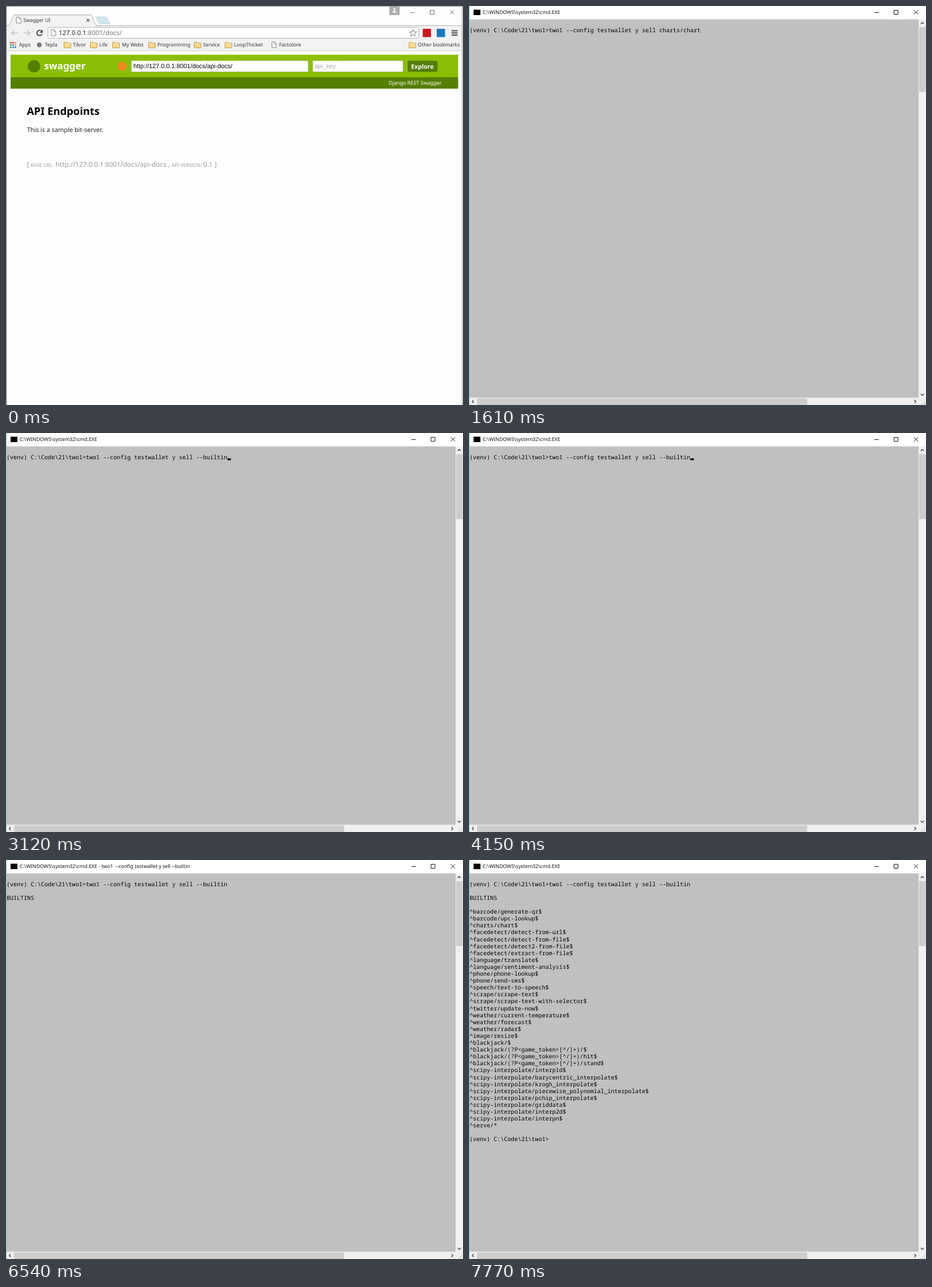
These frames come from a looping animation (800 px wide and 700 px high, 8 s). An HTML page:

```html
<!DOCTYPE html>
<html lang="en">
<head>
<meta charset="utf-8">
<title>Sell builtins</title>
<style>
  html, body { margin: 0; width: 100%; height: 100%; overflow: hidden; background: #fff; }
  svg { display: block; width: 800px; height: 700px; }
  text { white-space: pre; text-rendering: geometricPrecision; font-family: "Noto Sans", "Open Sans", sans-serif; }
  .mono { font-family: "Noto Sans Mono", "DejaVu Sans Mono", monospace; }
  .arial { font-family: "Liberation Sans", Arial, sans-serif; }
  .bold { font-weight: 700; }
</style>
</head>
<body>
<svg id="stage" viewBox="0 0 800 700" xmlns="http://www.w3.org/2000/svg">
  <g id="browser"></g>
  <g id="console"></g>
</svg>
<script>
const $ = id => document.getElementById(id);
const esc = s => s.replace(/&/g, '&amp;').replace(/</g, '&lt;');

const rect = (x, y, w, h, fill, more = '') =>
  `<rect x="${x}" y="${y}" width="${w}" height="${h}" fill="${fill}" ${more}/>`;
const line = (d, stroke, width = 1, more = '') =>
  `<path d="${d}" fill="none" stroke="${stroke}" stroke-width="${width}" ${more}/>`;
const disc = (x, y, r, fill) => `<circle cx="${x}" cy="${y}" r="${r}" fill="${fill}"/>`;
const label = (x, y, s, size, fill = '#000', cls = '') =>
  `<text x="${x}" y="${y}" font-size="${size}" fill="${fill}" class="${cls}">${esc(s)}</text>`;

const cross = (x, y, r, color, width) =>
  line(`M${x - r} ${y - r}l${2 * r} ${2 * r}m0 ${-2 * r}l${-2 * r} ${2 * r}`, color, width);
const windowButtons = (x, color) =>
  line(`M${x} 11.5h8`, color) +
  line(`M${x + 34.5} 7.5h7v7h-7z`, color) +
  cross(x + 73, 11, 3.7, color, 1);
const sheet = (x, y, w, h) =>
  `<path d="M${x} ${y}h${w - 3}l3 3v${h - 3}h${-w}z" fill="#fff" stroke="#777" stroke-width=".9"/>` +
  line(`M${x + w - 3} ${y}v3h3`, '#777', .8);
const folder = x =>
  `<path d="M${x + .5} 72.5v-8q0-1 1-1h3.5l1.5 1.5h5q1 0 1 1v6.5q0 1-1 1h-10q-1 0-1-1z"
    fill="#f8d790" stroke="#b98d35" stroke-width=".9"/>` + line(`M${x + 1.2} 66.3h10.6`, '#fff0c8', .8);

function starPath(cx, cy, outer, inner) {
  let d = '';
  for (let i = 0; i < 10; i++) {
    const r = i % 2 ? inner : outer, a = i * Math.PI / 5 - Math.PI / 2;
    d += `${i ? 'L' : 'M'}${(cx + r * Math.cos(a)).toFixed(2)} ${(cy + r * Math.sin(a)).toFixed(2)}`;
  }
  return d + 'z';
}

function appsGrid() {
  const colors = ['#e04a3f', '#e04a3f', '#f0a030', '#3aa757', '#4a7fd8', '#f0a030', '#3aa757', '#4a7fd8', '#4a7fd8'];
  return colors.map((c, i) => rect(7 + i % 3 * 4, 63 + Math.floor(i / 3) * 4, 2.8, 2.8, c)).join('');
}

function drawBrowser() {
  const ink = '#333', pale = '#c4c4c4', page = '#fefefe';
  const folders = [
    [101, 117, 'Tilvor'], [147, 163, 'Life'], [186, 203, 'My Webs'], [249, 265, 'Programming'],
    [329, 345, 'Service'], [383, 399, 'LoopThicket'], [705, 721, 'Other bookmarks']
  ];
  const grey = '#999';
  return rect(0, 0, 800, 700, page) +
    // tab strip
    rect(1, 34, 797, 45, '#f2f2f2') +
    line('M1 34.5H4M158 34.5H798', '#b4b4b4') +
    '<path d="M3 35q3 0 4-3l5-13q1-3 4-3h131q3 0 4 3l5 13q1 3 4 3z" fill="#f2f2f2"/>' +
    line('M1 34.5h2q3 0 4-3l5-13q1-3 4-3h131q3 0 4 3l5 13q1 3 4 3', '#aaa') +
    '<path d="M159 19h15q2 0 3 2l4 8q1 2-1 2h-15q-2 0-3-2l-4-8q-1-2 1-2z" fill="#d2e6ee" stroke="#b9ced6" stroke-width=".8"/>' +
    sheet(18, 19.5, 8, 10.5) +
    label(30.5, 28, 'Swagger UI', 8.7, ink) +
    cross(143.5, 25, 2.4, '#444', 1.3) +
    rect(671, 0, 18, 16, '#aeaeae') + disc(680, 5.6, 1.9, '#fff') +
    '<path d="M676.5 11.5q0-3 3.5-3t3.5 3z" fill="#fff"/>' +
    windowButtons(708, '#777') +
    // toolbar
    line('M21 47.2H10m4.5-4.5l-4.7 4.5l4.7 4.5', pale, 1.6) +
    line('M31 47.2h11m-4.5-4.5l4.7 4.5l-4.7 4.5', pale, 1.6) +
    line('M62.5 44.5a4.6 4.6 0 1 0 .6 4.3', '#444', 1.9) +
    '<path d="M64.4 41.5v5.4h-5.4z" fill="#444"/>' +
    rect(73.5, 37.5, 649, 19, '#fff', 'rx="2" stroke="#b5b5b5"') +
    sheet(79, 41.5, 8, 11) +
    '<text x="92.3" y="51.3" font-size="11.4" fill="#222">127.0.0.1<tspan fill="#777">:8001/docs/</tspan></text>' +
    line(starPath(712.5, 47.6, 6.6, 2.9), '#777', 1, 'stroke-linejoin="round"') +
    rect(729.5, 40, 14.5, 14.5, '#c9181e', 'rx="1"') +
    rect(754, 40, 14.5, 14.5, '#1478be', 'rx="1"') +
    line('M780 43.6h10.5m-10.5 3.7h10.5m-10.5 3.7h10.5', '#444', 2) +
    // bookmarks
    appsGrid() + label(22.7, 71.3, 'Apps', 8.9, ink) +
    disc(58.3, 68.2, 4.2, '#777') + label(68, 71.3, 'Tepla', 8.9, ink) +
    folders.map(([x, tx, s]) => folder(x) + label(tx, 71.3, s, 8.9, ink)).join('') +
    sheet(465.5, 63, 7.5, 10) + label(478, 71.3, 'Factolore', 8.9, ink) +
    line('M1 78.5H798', '#d0d0d0') +
    // page header
    rect(8, 85.5, 783.5, 39.5, '#89bf04') + rect(8, 125, 783.5, 20, '#547f00') +
    disc(49, 105.7, 10.8, '#547f00') +
    label(66.8, 111.3, 'swagger', 17, '#fff', 'bold') +
    disc(203, 105.7, 7.8, '#f5871f') +
    rect(219.5, 96, 309.5, 19.5, '#fff', 'stroke="#a9b58a" stroke-width=".8"') +
    label(223, 109.4, 'http://127.0.0.1:8001/docs/api-docs/', 10.9, '#000', 'arial') +
    rect(537, 96, 158, 19.5, '#fff', 'stroke="#a9b58a" stroke-width=".8"') +
    label(540.5, 109.4, 'api_key', 10.7, '#a9a9a9', 'arial') +
    rect(703, 96, 52.5, 19.5, '#547f00', 'rx="3"') +
    label(709, 109.6, 'Explore', 10.7, '#fff', 'bold') +
    label(669.8, 138.3, 'Django REST Swagger', 9, '#fff') +
    // page body
    label(36.5, 191, 'API Endpoints', 18.3, '#000', 'bold') +
    label(36.7, 220.6, 'This is a sample bit-server.', 10.87, '#222') +
    label(36.7, 282, '[', 11.67, grey) +
    label(43.3, 282, 'BASE URL:', 8.3, grey) +
    label(86.8, 282, 'http://127.0.0.1:8001/docs/api-docs', 11.67, grey) +
    label(283.8, 282, ',', 11.67, grey) +
    label(290, 282, 'API VERSION:', 8.3, grey) +
    label(345.5, 282, '0.1 ]', 11.67, grey) +
    // window edges
    line('M0 .5H800', '#9a9a9a') + line('M.5 0V700', '#52696b') + line('M798.5 0V700', '#8a9494');
}

// console text grid
const PITCH = 6.042, ROW = 12.1;
const PROMPT = String.raw`(venv) C:\Code\21\two1>`;
const TITLE = String.raw`C:\WINDOWS\system32\cmd.EXE`;
const SELL = 'two1 --config testwallet y sell ';
const COMMAND = SELL + '--builtin';
const BUSY = TITLE + ' - two1  --config testwallet y sell --builtin';

const group = (name, ends) => ends.split(' ').map(end => `^${name}/${end}`);
const ROUTES = [
  ...group('barcode', 'generate-qr$ upc-lookup$'),
  ...group('charts', 'chart$'),
  ...group('facedetect', 'detect-from-url$ detect-from-file$ detect2-from-file$ extract-from-file$'),
  ...group('language', 'translate$ sentiment-analysis$'),
  ...group('phone', 'phone-lookup$ send-sms$'),
  ...group('speech', 'text-to-speech$'),
  ...group('scrape', 'scrape-text$ scrape-text-with-selector$'),
  ...group('twitter', 'update-now$'),
  ...group('weather', 'current-temperature$ forecast$ radar$'),
  ...group('image', 'resize$'),
  ...group('blackjack', '$ (?P<game_token>[^/]+)/$ (?P<game_token>[^/]+)/hit$ (?P<game_token>[^/]+)/stand$'),
  ...group('scipy-interpolate', 'interp1d$ barycentric_interpolate$ krogh_interpolate$ ' +
    'piecewise_polynomial_interpolate$ pchip_interpolate$ griddata$ interp2d$ interpn$'),
  ...group('serve', '*')
];

function drawConsole({ command = '', output = [], cursor, title = TITLE }) {
  const rows = [PROMPT + command, ...output];
  const text = rows.map((s, i) => s && label(.9, (45.7 + ROW * i).toFixed(1), s, 10.07, '#000', 'mono')).join('');
  let caret = '';
  if (cursor !== undefined) {
    const col = cursor ? 0 : rows[0].length;
    caret = rect((.9 + PITCH * col).toFixed(1), (44.5 + ROW * cursor).toFixed(1), 6, 3.2, '#000');
  }
  let grip = '';
  for (let i = 0; i < 3; i++)
    for (let j = 0; j <= i; j++) grip += rect(797 - j * 2.7, 692.3 + i * 2.7, 1.4, 1.4, '#b5b5b5');

  return rect(0, 0, 800, 700, '#fff') +
    rect(8, 6.5, 12, 9.5, '#000') +
    label(24, 14.2, title, 8.75, '#111') +
    windowButtons(709.5, '#111') +
    rect(0, 23.5, 787, 664, '#c0c0c0') +
    rect(787, 23.5, 13, 676.5, '#f0f0f0') + rect(0, 687.5, 800, 12.5, '#f0f0f0') +
    rect(788, 37, 11.5, 114, '#cdcdcd') + rect(14, 688.5, 578, 11.5, '#cdcdcd') +
    line('M790.8 31.5l2.7-2.7l2.7 2.7M790.8 680.5l2.7 2.7l2.7-2.7', '#444', 1.4) +
    line('M8.3 691.3l-2.7 2.7l2.7 2.7M779.7 691.3l2.7 2.7l-2.7 2.7', '#444', 1.4) +
    grip + line('M.5 0V700', '#74d0d3') + text + caret;
}

// cursor is the row of the caret; row 0 places it after the command
const LONG = SELL + '--port 8000 charts/chart language/translate phone/phone-lookup serve/test';
const HEAD = ['', 'BUILTINS'];
const LISTED = [...HEAD, '', ...ROUTES];
const blink = [2030, 2560, 3120, 3680, 4150, 4740, 5170, 5760].map((at, i) =>
  [at, { command: COMMAND, cursor: i % 2 ? undefined : 0 }]);
const STEPS = [
  [0, null],
  [500, {}],
  [1060, { cursor: 0 }],
  [1460, { command: 'cls' }],
  [1610, { command: SELL + 'charts/chart' }],
  [1730, { command: LONG }],
  [1880, { command: SELL + 'barcode/upc-lookup' }],
  ...blink,
  [6290, { command: COMMAND, title: BUSY, cursor: 1 }],
  [6540, { command: COMMAND, title: BUSY, output: HEAD }],
  [7340, { command: COMMAND, title: BUSY, output: HEAD, cursor: 4 }],
  [7650, { command: COMMAND, title: BUSY, output: LISTED }],
  [7770, { command: COMMAND, output: [...LISTED, '', PROMPT] }]
];
const LOOP = 8000;

$('browser').innerHTML = drawBrowser();
const start = performance.now();
let shown = -1;

function tick() {
  const t = (performance.now() - start) % LOOP;
  const step = STEPS.filter(([at]) => at <= t).length - 1;
  if (step !== shown) {
    const state = STEPS[step][1];
    $('browser').style.display = state ? 'none' : '';
    $('console').innerHTML = state ? drawConsole(state) : '';
    shown = step;
  }
  requestAnimationFrame(tick);
}
tick();
</script>
</body>
</html>
```
